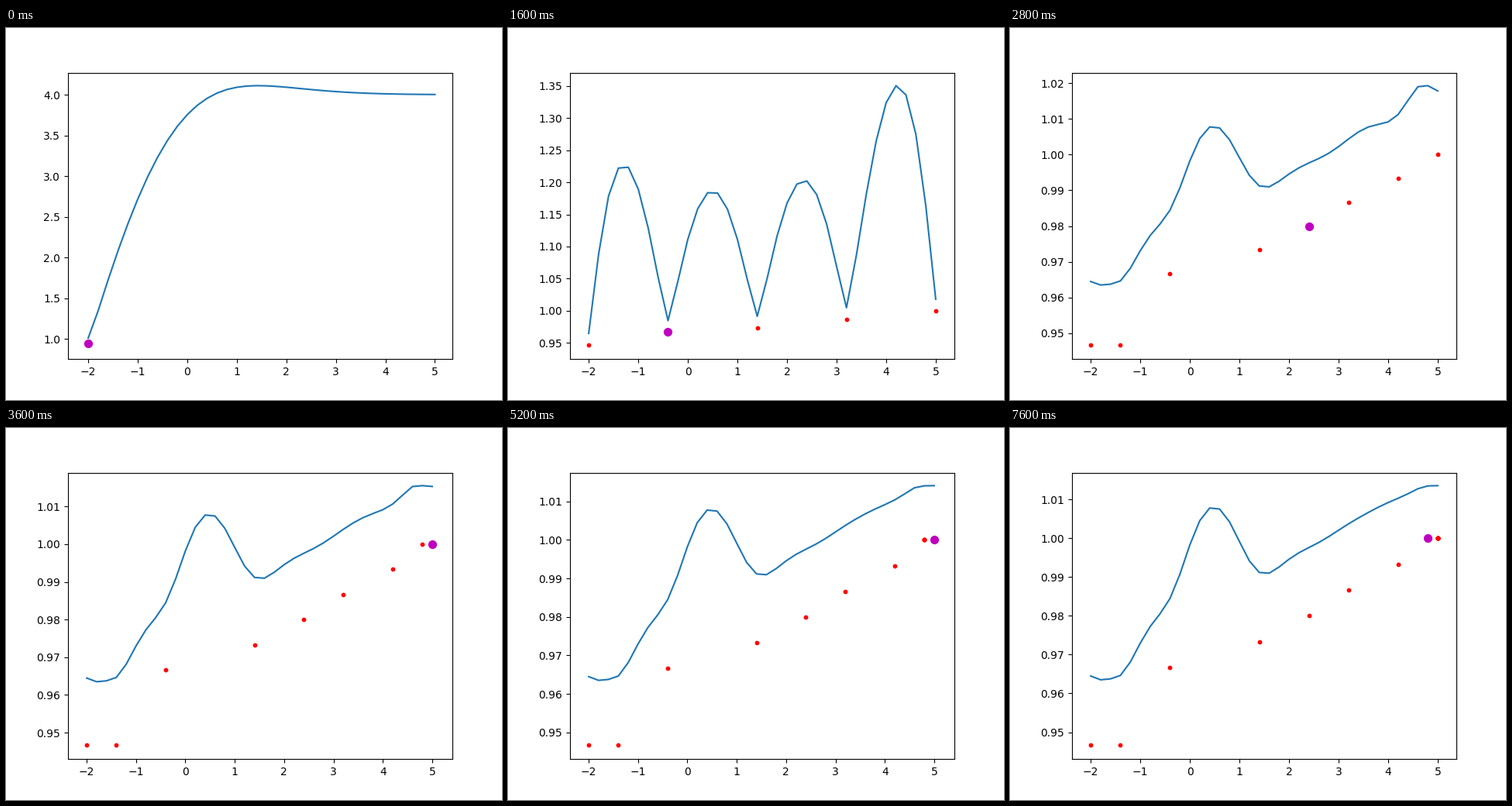
Animation, 640 px wide and 480 px high, one loop 8000 ms. Source, as a matplotlib script:

```python
import numpy as np
import matplotlib.pyplot as plt
from matplotlib.animation import FuncAnimation

# Bayesian optimisation with an upper-confidence-bound acquisition
STEPS = 20
LENGTH_SCALE = 2.0
BETA = 4.0
FIRST_NOISE, NOISE = 1.35e-4, 1e-5
RED_SIZE, NEW_SIZE = 10, 50
AXES_WIDTH, AXES_HEIGHT = 496.0, 369.6

grid = np.linspace(-2, 5, 36)


def accuracy(x):
    """Share of 150 samples classified correctly, in whole samples."""
    return np.floor(np.interp(x, [-1.3, -0.5, 4.6], [142, 145, 150])) / 150


def rbf(a, b):
    return np.exp(-0.5 * ((a[:, None] - b[None, :]) / LENGTH_SCALE) ** 2)


def upper_bound(x, y):
    noise = NOISE if len(x) > 1 else FIRST_NOISE
    cross = rbf(grid, x)
    weights = np.linalg.solve(rbf(x, x) + noise * np.eye(len(x)), cross.T)
    variance = 1 + noise - np.sum(cross * weights.T, axis=1)
    return weights.T @ y + BETA * np.sqrt(np.maximum(variance, noise))


def optimise():
    """Sample the maximum of the bound again and again."""
    x, curves = grid[:1], []
    for _ in range(STEPS):
        curves.append(upper_bound(x, accuracy(x)))
        x = np.append(x, grid[np.argmax(curves[-1])])
    return x, curves


def padded_limits(line, groups, length):
    """Limits that make room for the markers, plus a 5% margin."""
    low, high = line.min(), line.max()
    for values, size in groups:
        if len(values):
            pad = np.sqrt(size) / 2 * 1.1 * (high - low) / length
            low, high = (min(low, values.min() - pad),
                         max(high, values.max() + pad))
    margin = 0.05 * (high - low)
    return low - margin, high + margin


visited, curves = optimise()
fig, ax = plt.subplots(figsize=(6.4, 4.8), dpi=100)


def update(step):
    x, curve = visited[:step + 1], curves[step]
    y = accuracy(x)

    ax.clear()
    ax.plot(grid, curve)
    ax.scatter(x[:-1], y[:-1], s=RED_SIZE, c="r")
    ax.scatter(x[-1:], y[-1:], s=NEW_SIZE, c="m")
    ax.set_xlim(padded_limits(
        grid, [(x[:-1], RED_SIZE), (x[-1:], NEW_SIZE)], AXES_WIDTH))
    ax.set_ylim(padded_limits(
        curve, [(y[:-1], RED_SIZE), (y[-1:], NEW_SIZE)], AXES_HEIGHT))
    return ax.get_children()


anim = FuncAnimation(fig, update, frames=STEPS, interval=400,
                     repeat=True, repeat_delay=0)
plt.show()
```
